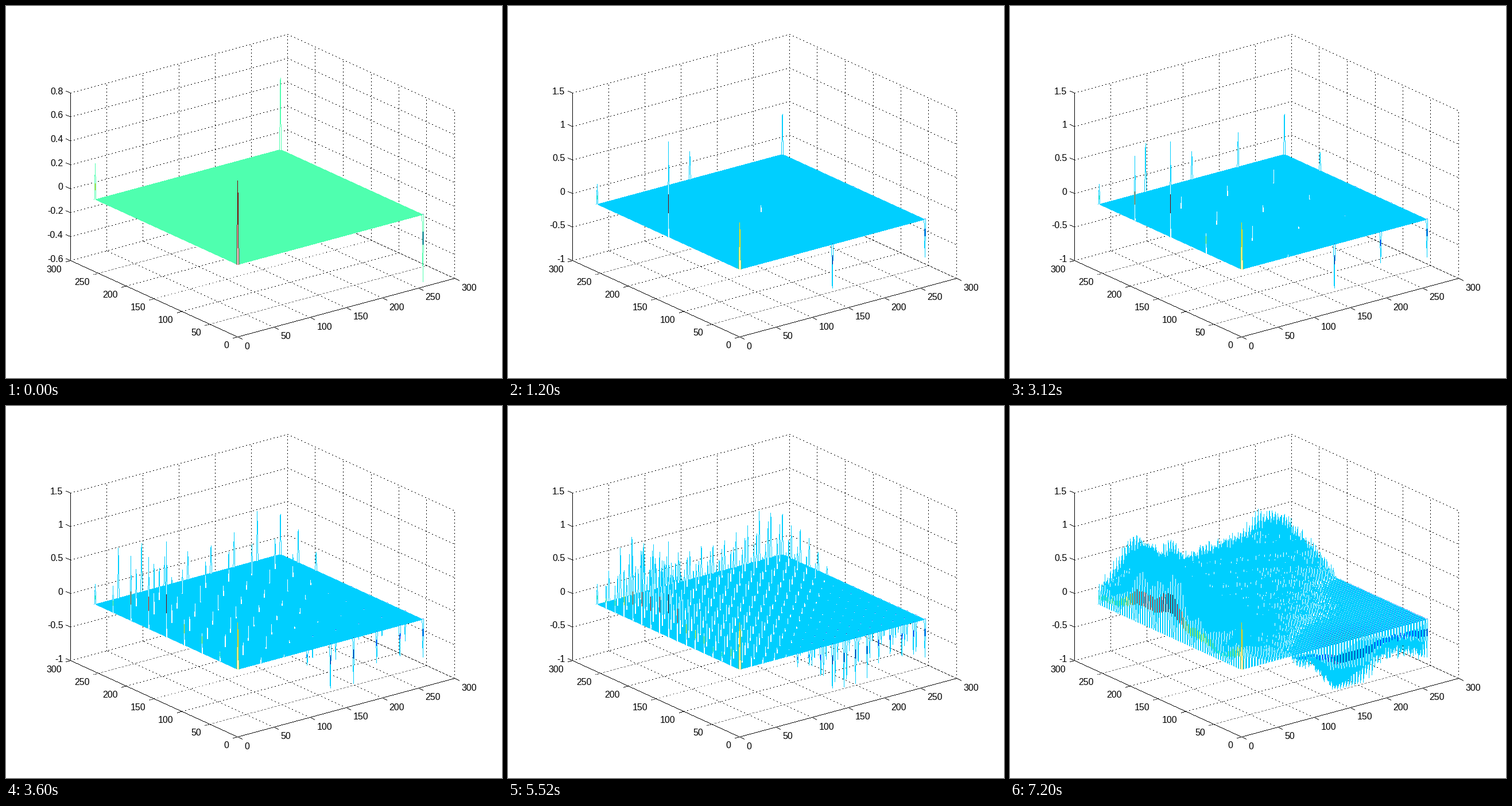
A matplotlib script that plays this animation: 864 px wide and 648 px high, repeating every 8 s.

```python
import numpy as np
import matplotlib.pyplot as plt
from matplotlib.animation import FuncAnimation

W, H = 864, 648
BOX = 292          # height of the z axis in pixels
N = 257            # terrain points per side
STAGES = 7
WHITE, BLACK = (255, 255, 255), (0, 0, 0)
AXES = np.array([[1.26, -.97], [-.34, -.4433]])   # floor axes on screen
ORIGIN = np.array([403, 576])
UP = np.array([0, -BOX])


def make_terrain(n=65):
    """A twisted sheet with hills (u, v, height, width) and fine noise."""
    u, v = np.meshgrid(*[np.linspace(0, 1, n)] * 2, indexing="ij")
    z = (1 - u) * (.75 - .51 * v) + u * (-.56 + 1.14 * v)
    hills = [(0, .5, .9, .09), (.03, .7, .75, .12), (.18, 1, .55, .12),
             (.875, 1, .2, .08), (0, .14, -.45, .08), (.13, 0, -.4, .08),
             (.3, 0, -.35, .1), (.55, 0, -.8, .18), (1, .5, -.3, .15)]
    for a, b, height, width in hills:
        z += height * np.exp(-((u - a) ** 2 + (v - b) ** 2) / width ** 2)
    noise = np.random.default_rng(4).uniform(-.06, .06, z.shape)
    noise[::16, ::16] = 0
    return np.clip(z + noise, -.68, 1.42)


def floor_point(x, y):
    return ORIGIN + AXES @ (x, y)


def jet(z, lo, hi):
    """Colour from a 64 step jet map."""
    k = min(int((z - lo) / (hi - lo) * 64), 63) + 1
    return [int(255 * np.clip(min((k - a) / 16, (a + 48 - k) / 16), 0, 1))
            for a in (24, 8, -8)]


def z_range(stage):
    return (-.6, .8, .2) if stage == 0 else (-1, 1.5, .5)


def z_ticks(stage):
    lo, hi, step = z_range(stage)
    for v in np.arange(lo, hi + step / 2, step):
        yield round(v, 1) + 0, UP * (v - lo) / (hi - lo)


def line(img, a, b, dotted=False):
    """One pixel wide line without smoothing."""
    a, b = np.asarray(a), np.asarray(b)
    count = int(np.abs(b - a).max()) + 1
    steps = np.arange(count)
    if dotted:
        steps = steps[steps % 6 < 2]
    pts = a + (b - a) * steps[:, None] / max(count - 1, 1)
    cols, rows = np.rint(pts).astype(int).T
    img[rows, cols] = BLACK


def draw_box(img, stage):
    right, left, back = (floor_point(*p) for p in
                         ((300, 0), (0, 300), (300, 300)))
    for v in range(0, 301, 50):
        px, py = floor_point(v, 0), floor_point(0, v)
        bx, by = floor_point(v, 300), floor_point(300, v)
        for a, b in ((px, bx), (py, by), (bx, bx + UP), (by, by + UP)):
            line(img, a, b, dotted=True)
        line(img, px, px + [8, 3.7])
        line(img, py, py + [-8, 2.2])
    for _, rise in z_ticks(stage):
        line(img, left + rise, back + rise, dotted=True)
        line(img, back + rise, right + rise, dotted=True)
        line(img, left + rise, left + rise + [-8, -3.5])
    line(img, left, left + UP)
    line(img, left, ORIGIN)
    line(img, ORIGIN, right)


def draw_spike(img, base, height, edge, tone):
    """A thin white pyramid with coloured sides; tone marks the outer rim."""
    px, py = base
    top = py - height
    first, last = sorted((round(top), round(py)))
    rows = np.arange(first, last + 1)
    t = np.clip((rows - top) / height, 0, 1)
    mid = round(px)
    left = np.rint(px - 1.5 * t).astype(int)
    right = np.rint(px + 1.5 * t).astype(int)
    for col in (mid - 1, mid, mid + 1):
        img[rows, np.clip(col, left, right)] = WHITE
    img[rows, left] = edge
    img[rows, right] = edge
    if tone is not None:
        band = rows[(t > .55) & (t < .75)]
        img[band, mid] = tone


def draw_plane(img, level, color):
    rows, cols = np.mgrid[:H, :W]
    screen = np.stack([cols - ORIGIN[0], rows + level - ORIGIN[1]])
    x, y = np.tensordot(np.linalg.inv(AXES), screen, 1)
    img[(x >= .5) & (x <= N + .5) & (y >= .5) & (y <= N + .5)] = color


def draw_stage(stage):
    img = np.full((H, W, 3), 255, np.uint8)
    draw_box(img, stage)
    step = 64 >> stage
    z = terrain[::step, ::step]
    lo, hi, _ = z_range(stage)
    unit = BOX / (hi - lo)
    limits = z.min(), z.max()
    plane = jet(0, *limits)

    hills, pits = [], []
    cells = sorted(np.ndindex(z.shape), key=lambda c: -.61 * c[0] - .79 * c[1])
    for i, j in cells:
        height = z[i, j] * unit
        if abs(height) < 1:
            continue
        base = floor_point(1 + 4 * step * i, 1 + 4 * step * j)
        base = base + [0, lo * unit]
        color = jet(z[i, j], *limits)
        rim = i == 0 if height > 0 else j == 0
        edge = color if i == j == 0 else plane
        spike = base, height, edge, color if rim and i + j else None
        (hills if height > 0 else pits).append((spike, color))

    for spike, _ in pits:
        draw_spike(img, *spike)
    draw_plane(img, -lo * unit, plane)
    for (base, *_), color in pits:
        col, row = np.rint(base).astype(int)
        img[row, col] = WHITE
        img[row - 1, col] = color
    for spike, _ in hills:
        draw_spike(img, *spike)
    return img


def label(p, dx, dy, text, align):
    return ax.text(p[0] + dx, p[1] + dy, text, ha=align, fontsize=16,
                   family="Liberation Sans", va="center_baseline")


terrain = make_terrain()
pictures = [draw_stage(s) for s in range(STAGES)]

fig = plt.figure(figsize=(W / 72, H / 72), dpi=72, facecolor="white")
ax = fig.add_axes([0, 0, 1, 1])
ax.axis("off")
view = ax.imshow(pictures[0], aspect="auto", interpolation="nearest")
for v in range(0, 301, 50):
    label(floor_point(v, 0), 12, 15, str(v), "left")
    label(floor_point(0, v), -15, 14, str(v), "right")
z_labels = [[label(floor_point(0, 300) + rise, -13, -4, f"{v:g}", "right")
             for v, rise in z_ticks(s)] for s in (0, 1)]


def update(frame):
    stage = min(frame // 3, STAGES - 1)
    view.set_data(pictures[stage])
    for k, group in enumerate(z_labels):
        for text in group:
            text.set_visible(k == min(stage, 1))
    return []


anim = FuncAnimation(fig, update, frames=20, interval=400, repeat=True,
                     repeat_delay=0, init_func=lambda: update(0))
plt.show()
```
